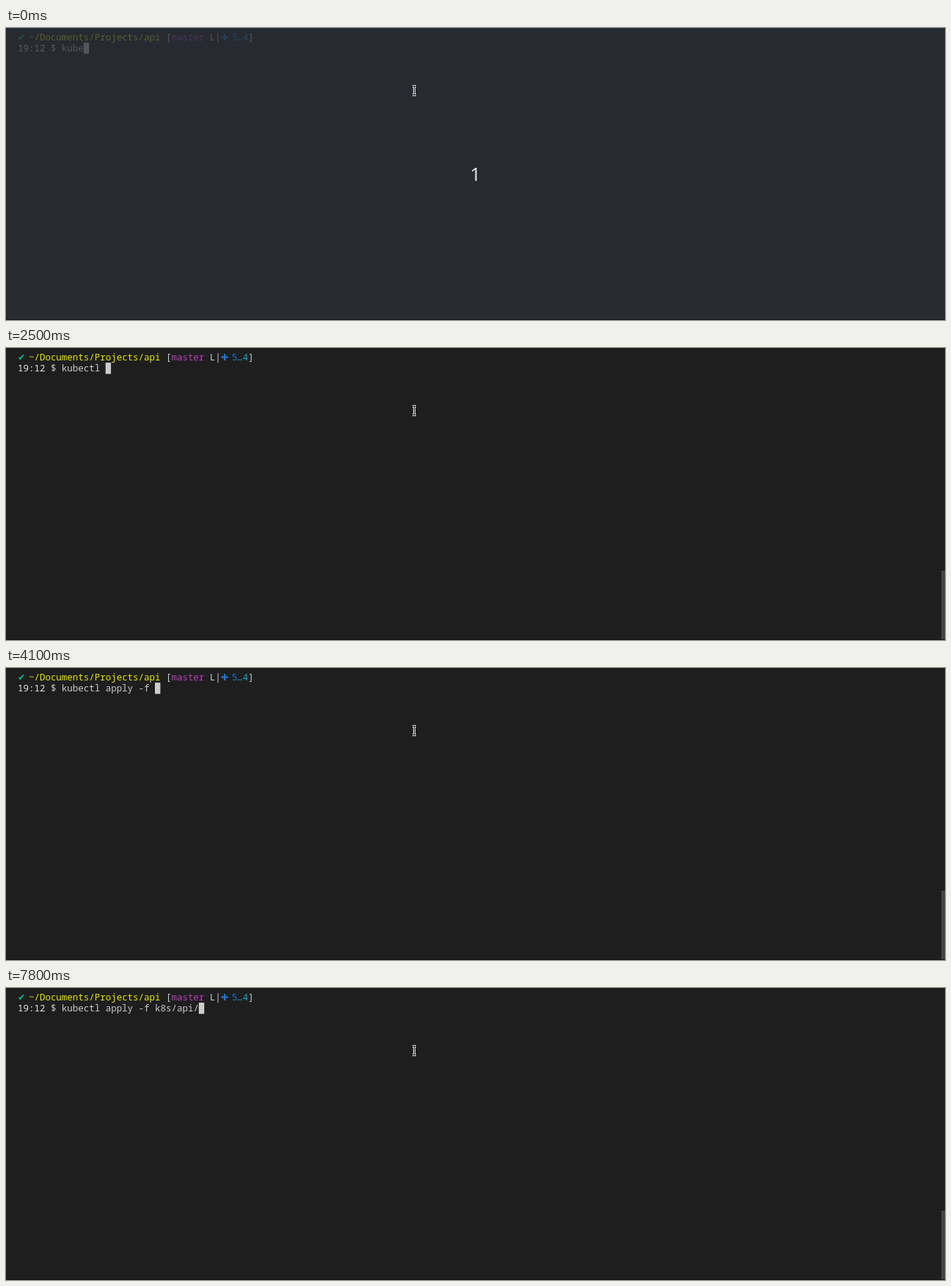
These frames come from a looping animation (1280x399 px, 8 s). An HTML page:

```html
<!DOCTYPE html>
<html lang="en">
<head>
<meta charset="utf-8">
<title>Terminal typing</title>
<style>
  html, body { margin: 0; width: 100%; height: 100%; overflow: hidden; background: #1e1e1e; }
  svg { display: block; }
  .term { font: 12.47px "Noto Sans Mono", "DejaVu Sans", monospace; fill: #ccc; white-space: pre; }
  .count { font: 26px "Noto Sans", sans-serif; fill: #dcdcdc; text-anchor: middle; }
</style>
</head>
<body>
<svg width="1280" height="399" viewBox="0 0 1280 399">
  <rect width="1280" height="399" fill="#1e1e1e"/>
  <rect x="1275" y="304" width="5" height="94" fill="#424242"/>
  <g id="term" class="term"></g>
  <rect id="caret" y="20" width="7.4" height="15.4" fill="#ccc"/>
  <g id="countdown">
    <rect width="1280" height="399" fill="#2a2e37" fill-opacity=".75"/>
    <rect x="1275" y="304" width="5" height="94" fill="#272a31"/>
    <text class="count" x="640" y="209">1</text>
  </g>
  <rect y="398" width="1280" height="1" fill="#141518"/>
  <g id="pointer" fill="none">
    <path d="M554 79.5h5M556.5 79.5v12M554 91.5h5" stroke="#fff" stroke-width="3"/>
    <path d="M554 79.5h5M556.5 79.5v12M554 91.5h5" stroke="#000"/>
  </g>
</svg>
<script>
const LOOP = 8000, CELL = 7.48, LEFT = 16;
const COMMAND = 'kubectl apply -f k8s/api/';
// [time in ms, characters typed so far]
const KEYS = [
  [0, 4], [2000, 6], [2200, 7], [2500, 8], [2700, 10], [2800, 12], [2900, 14],
  [3600, 15], [3900, 16], [4100, 17], [5700, 18], [5900, 20], [6600, 21],
  [6900, 22], [7600, 24], [7800, 25]
];
const $ = id => document.getElementById(id);
const colX = col => LEFT + col * CELL;

function addText(col, y, text, fill) {
  const el = document.createElementNS('http://www.w3.org/2000/svg', 'text');
  el.setAttribute('x', colX(col));
  el.setAttribute('y', y);
  if (fill) el.setAttribute('fill', fill);
  el.textContent = text;
  return $('term').appendChild(el);
}

addText(0, 17, '✔', '#0dbc79');
addText(2, 17, '~/Documents/Projects/api', '#e5e510');
addText(27, 17, '[');
addText(28, 17, 'master', '#bc3fbc');
addText(35, 17, 'L|');
addText(37, 17, '✚', '#2472c8');
addText(39, 17, '5', '#2472c8');
addText(40, 17, '…4', '#11a8cd');
addText(42, 17, ']');
addText(0, 32, '19:12', '#e5e5e5');
addText(6, 32, '$');
const command = addText(8, 32, '');

function draw(now) {
  const t = now % LOOP;
  const typed = KEYS.findLast(([time]) => time <= t)[1];
  command.textContent = COMMAND.slice(0, typed);
  $('caret').setAttribute('x', colX(8 + typed));
  $('countdown').style.display = t < 500 ? '' : 'none';
}

const start = performance.now();
function tick() {
  draw(performance.now() - start);
  requestAnimationFrame(tick);
}
tick();
</script>
</body>
</html>
```
